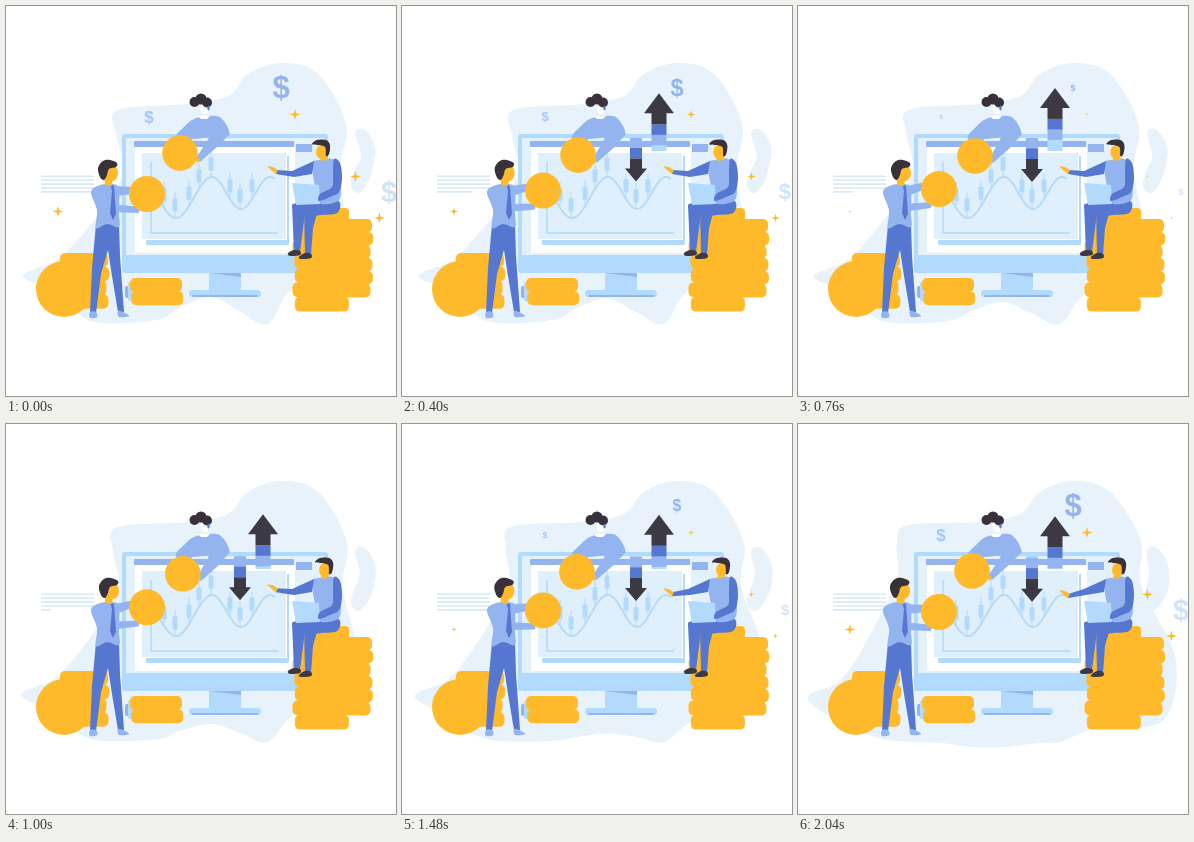
Animation, 390 px wide and 390 px high, one loop 2080 ms. Source, as an HTML page with a canvas:

```html
<!DOCTYPE html>
<html lang="en">
<head>
<meta charset="utf-8">
<title>Market growth</title>
<style>
html, body { margin: 0; width: 100%; height: 100%; overflow: hidden; background: #fff; }
canvas { display: block; width: 390px; height: 390px; }
</style>
</head>
<body>
<canvas id="stage" width="390" height="390"></canvas>
<script>
const ctx = document.getElementById('stage').getContext('2d');
const LOOP = 2080, STEP = 40;
const GOLD = '#ffba2c', BLUE = '#5577cf', PERI = '#94b4f0', SKY = '#b1dafd',
      PALE = '#e8f2fa', SCREEN = '#e3f1fd', DARK = '#3d3942', HAIR = '#393139';

// Outline points: x, y and how far each is pushed away from the centre.
const cloud = [[112,104,4], [180,98,0], [222,90,0], [242,68,0], [275,57,0], [312,68,0],
  [340,118,3], [334,165,10], [340,225,40], [330,275,42], [285,285,25], [262,318,0],
  [235,306,14], [205,291,33], [175,301,23], [150,314,6], [85,315,0], [50,285,18],
  [17,270,8], [52,253,12], [82,222,20], [106,190,24], [118,162,20], [110,128,14]];
const drop = [[349,127,0], [359,124,0], [369,141,1], [367,160,6], [361,178,4],
  [352,187,0], [345,180,0], [347,168,0], [355,150,4]];

const { sin, cos, PI, min, max, abs, hypot } = Math;
const mix = (a, b, p) => a + (b - a) * p;
const clamp = p => max(0, min(1, p));
const smooth = p => (1 - cos(PI * clamp(p))) / 2;

function rect(color, x, y, w, h, r = 0) {
  ctx.fillStyle = color;
  ctx.beginPath();
  ctx.roundRect(x, y, w, h, r);
  ctx.fill();
}

function disc(color, x, y, rx, ry = rx) {
  ctx.fillStyle = color;
  ctx.beginPath();
  ctx.ellipse(x, y, rx, ry, 0, 0, 2 * PI);
  ctx.fill();
}

function poly(color, ...p) {
  ctx.fillStyle = color;
  ctx.beginPath();
  for (let i = 0; i < p.length; i += 2) ctx.lineTo(p[i], p[i + 1]);
  ctx.fill();
}

// Closed smooth shape through the given points.
function soft(color, ...p) {
  const n = p.length, at = i => p[(i + n) % n];
  ctx.fillStyle = color;
  ctx.beginPath();
  ctx.moveTo(p[0], p[1]);
  for (let i = 0; i < n; i += 2) {
    ctx.bezierCurveTo(
      at(i) + (at(i + 2) - at(i - 2)) / 6, at(i + 1) + (at(i + 3) - at(i - 1)) / 6,
      at(i + 2) - (at(i + 4) - at(i)) / 6, at(i + 3) - (at(i + 5) - at(i + 1)) / 6,
      at(i + 2), at(i + 3));
  }
  ctx.fill();
}

function swell(points, cx, cy, grow) {
  soft(PALE, ...points.flatMap(([x, y, push]) => {
    const k = push * grow / hypot(x - cx, y - cy);
    return [x + (x - cx) * k, y + (y - cy) * k];
  }));
}

function dollar(color, x, y, size, k) {
  if (k < 0.02) return;
  ctx.save();
  ctx.translate(x, y);
  ctx.scale(k, k);
  ctx.fillStyle = color;
  ctx.font = `bold ${size}px "Liberation Sans", Arial, sans-serif`;
  ctx.textAlign = 'center';
  ctx.fillText('$', 0, size * 0.33);
  ctx.restore();
}

function star(x, y, r) {
  ctx.fillStyle = GOLD;
  ctx.beginPath();
  for (let i = 0; i < 8; i++) {
    const d = i % 2 ? r * 0.3 : r, a = i * PI / 4;
    ctx.lineTo(x + d * sin(a), y - d * cos(a));
  }
  ctx.fill();
}

// Pile of coins with slightly shifted layers.
function pile(x, y, w, layers, h) {
  for (let i = 0; i < layers; i++) {
    rect(GOLD, x + 1.5 * sin(i * 2.2), y + i * h, w, h + 0.5, 5);
    if (i) rect(GOLD, x + 4, y + i * h - 5, w - 7, 10);
  }
}

// Height of the price curve, with its peak at x = 206.
function price(x) {
  const left = x < 206, p = left ? (206 - x) / 36 : (x - 206) / 29;
  return mix(171, left ? 212 : 203, (1 - cos(PI * p)) / 2);
}

function monitor() {
  rect(SKY, 203, 265, 32, 22);
  poly(PERI, 203, 267, 235, 267, 235, 271);
  rect(SKY, 183, 284, 72, 7, 3.5);
  rect(PERI, 186, 289, 66, 2, 1);
  rect(SKY, 116, 128, 206, 139, 3);
  rect(SCREEN, 120, 132, 198, 117);
  rect('#fff', 129, 141, 160, 106);
  rect(PERI, 128, 135, 160, 6, 1);
  rect(PERI, 290, 138, 16, 8);
  rect(SKY, 140, 234, 143, 5, 1);
  rect(SKY, 280, 150, 3, 88);
  rect('#fff', 135, 146, 146, 88);
  rect('#dfeffb', 136, 147, 144, 86);

  ctx.strokeStyle = SKY;
  ctx.lineWidth = 1.5;
  ctx.beginPath();
  ctx.moveTo(145, 156);
  ctx.lineTo(145, 227);
  ctx.lineTo(272, 227);
  ctx.stroke();

  for (const x of [158, 169, 183, 193, 205, 224, 234, 246]) {
    const y = price(x) - 13;
    rect(SKY, x - 0.5, y - 13, 1, 26);
    rect(SKY, x - 2.5, y - 6.5, 5, 13);
  }
  ctx.strokeStyle = '#b8daf4';
  ctx.lineWidth = 2;
  ctx.beginPath();
  for (let x = 152; x < 270; x++) ctx.lineTo(x, price(x));
  ctx.stroke();
}

function woman(s) {
  soft(PERI, 170, 131, 179, 120, 188, 113, 202, 110, 215, 112, 223, 128, 205, 131, 185, 133);
  poly('#fff', 192, 110, 204, 110, 201, 113, 195, 113);
  poly(PERI, 208, 111, 217, 114, 224, 128, 211 + s, 141 + s, 194 + s, 156 + s,
       190 + s, 152 + s, 202, 134);
  disc('#fff', 199, 102, 4.5, 6);
  disc(HAIR, 188.5, 96, 5);
  disc(HAIR, 195, 93, 5.5);
  disc(HAIR, 201, 96.5, 5);
  disc(BLUE, 202.5, 102, 1.2, 2.5);
  poly(PERI, 170, 131, 179, 121, 192, 121, 184, 137, 172, 142);
  disc(GOLD, 174 + 3 * s, 147 + 3 * s, 17.8);
  poly(GOLD, 188 + s, 153 + s, 194 + s, 152 + s, 192 + s, 157 + s);
}

function standingMan(s) {
  const lift = 5 * s;
  poly(BLUE, 90, 218, 113, 218, 114, 250, 118, 306, 112, 306, 106, 270, 102, 244,
       95, 268, 90, 307, 84, 307, 86, 262);
  soft(PERI, 84, 306, 90, 306, 91, 311, 84, 312);
  soft(PERI, 112, 305, 117, 306, 123, 310, 113, 311);
  soft(PERI, 85, 186, 94, 179, 107, 178, 113, 183, 113, 207, 113, 221, 101, 218, 90, 222, 91, 204);
  poly(PERI, 109, 180, 127, 181 - lift, 127, 188 - lift, 110, 190);
  poly(PERI, 87, 188, 98, 193, 106, 198, 134, 201 - lift, 133, 207 - lift, 105, 206, 91, 203);
  poly(BLUE, 104, 178, 108, 180, 110, 208, 107, 214, 104, 207, 106, 185);
  poly(GOLD, 98 + s, 170, 107 + s, 170, 106, 180, 99, 179);
  disc(GOLD, 106 + s, 167, 6, 8);
  soft(HAIR, 92 + s, 162, 97 + s, 155, 104 + s, 154, 111 + s, 157, 110 + s, 161,
       103 + s, 163, 101 + s, 169, 98 + s, 174, 94 + s, 171);
  disc(GOLD, 141, 188 - lift, 18);
}

function sittingMan(t) {
  const s = 4 * clamp(t / 1280), y = mix(162, 168, smooth((t - 900) / 900));
  poly(BLUE, 286, 199, 298, 196, 298, 215, 294, 246, 288, 246);
  poly(BLUE, 298, 203, 312, 204, 307, 222, 305, 249, 299, 249);
  soft(BLUE, 286, 199, 302, 196, 325, 192, 334, 197, 331, 207, 315, 209, 296, 210);
  soft(DARK, 282, 247, 288, 244, 294, 245, 294, 249, 284, 250);
  soft(DARK, 293, 251, 299, 247, 305, 248, 305, 252, 295, 253);
  soft(PERI, 306, 158, 313, 154, 326, 153, 334, 160, 335, 180, 332, 195, 313, 197, 309, 180);
  poly(BLUE, 308, 155, 306, 168, 288, 171, 270, y + 6, 270, y + 2, 286, 165);
  poly(GOLD, 261, y - 2, 267, y - 1, 272, y + 2, 270, y + 6, 265, y + 2);
  poly(SKY, 286, 177, 313, 179, 314, 198, 290, 199);
  soft(BLUE, 328, 153, 334, 157, 336, 172, 333, 186, 324, 191, 313, 195, 314, 188, 326, 181, 327, 168);
  poly(GOLD, 313 + s, 148, 321 + s, 147, 322, 154, 315, 155);
  disc(GOLD, 315.5 + s, 146, 5.5, 7);
  soft(HAIR, 306 + s, 138, 311 + s, 134, 320 + s, 134, 324 + s, 139, 323 + s, 148,
       320 + s, 150, 319 + s, 141, 311 + s, 139);
}

// Arrow with a banded tail; dir is 1 for up and -1 for down, base is where the tail is cut.
function arrow(x, tip, base, dir, stem, wing, head, shaft) {
  ctx.save();
  ctx.beginPath();
  ctx.rect(x - wing, base, wing * 2, -dir * 90);
  ctx.clip();
  ctx.translate(x, tip);
  ctx.scale(1, dir);
  rect(SKY, -stem, shaft + 20, stem * 2, 70);
  rect(PERI, -stem, shaft + 10, stem * 2, 11);
  rect(BLUE, -stem, shaft, stem * 2, 10.5);
  rect(DARK, -stem, head - 1, stem * 2, shaft - head + 1);
  poly(DARK, 0, 0, wing, head, -wing, head);
  ctx.restore();
}

function arrows(t) {
  const enter = 1 - (1 - clamp(t / 300)) ** 3;
  const up = 85.8 + (t - 760) * 0.002 + 4 * cos(2 * PI * (t - 1000) / 520);
  arrow(257, mix(146, up, enter), 145, 1, 7.5, 15, 20, 31);
  arrow(234, mix(131, 175 + t * 0.0013, enter), 132, -1, 6, 11, 13, 23);
}

function draw(t) {
  rect('#fff', 0, 0, 390, 390);
  const grow = 1 - cos(PI * t / LOOP / 2);
  swell(cloud, 200, 190, grow);
  swell(drop, 360, 150, grow);

  for (let i = 0; i < 5; i++) {
    const cut = i === 4 && t < LOOP / 2 ? 43 * t / 1000 : 0;
    rect('#d9e8f6', 35, 169.5 + i * 3.9, 53 - cut, 1.6);
  }

  const k = abs(cos(PI * t / LOOP)) ** 1.4;
  dollar(PERI, 275, 82, 31, k);
  dollar('#a2c8f6', 143, 111, 17, k);
  dollar('#d0e4f8', 383, 186, 29, k);
  for (const [x, y] of [[52, 205.5], [289, 108.5], [349.5, 170.5], [373.5, 212]]) star(x, y, 5.5 * k);

  monitor();
  arrows(t);

  const sway = max(0, sin(PI * t / 1640));
  woman(sway);

  pile(54, 247, 48, 4, 13.8);
  disc(GOLD, 58, 283, 28);
  rect(PERI, 119, 280, 9, 12, 2);
  rect(SKY, 122, 276, 6, 19, 2);
  pile(124, 272, 52, 2, 13.4);
  pile(316, 213, 50, 6, 13);
  rect(GOLD, 312, 202, 31, 14, 4);
  pile(288, 205, 54, 7, 14.3);
  standingMan(sway);
  sittingMan(t);
}

function tick() {
  const t = performance.now() % LOOP;
  draw(Math.floor(t / STEP) * STEP);
  requestAnimationFrame(tick);
}
tick();
</script>
</body>
</html>
```
